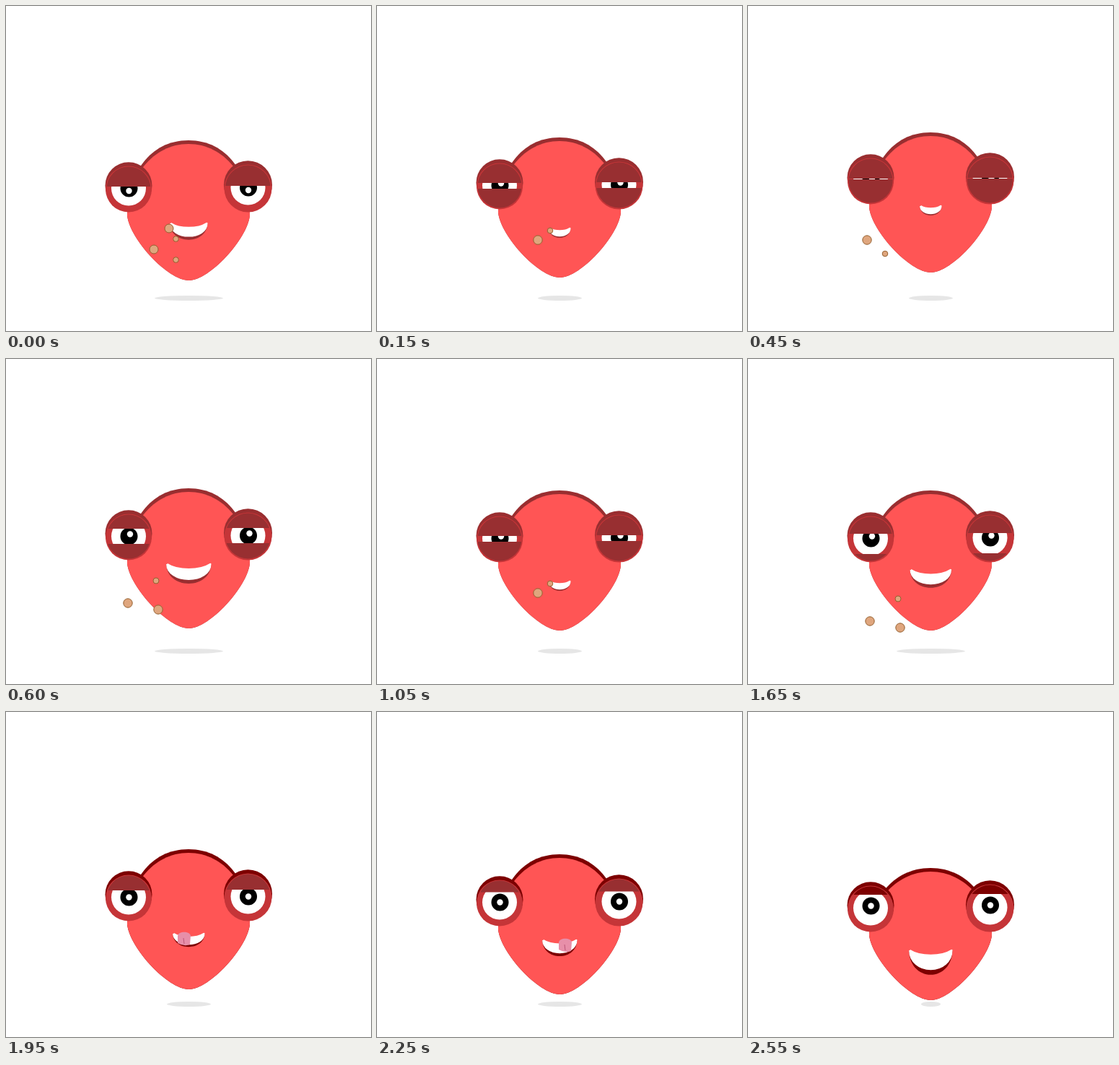
Recreate the animation shown at these times as an HTML page with a canvas. Size 506 by 450 pixels, loop 2.7 s.

```html
<!DOCTYPE html>
<html>
<head>
<meta charset="utf-8">
<style>
html, body { margin: 0; width: 100%; height: 100%; overflow: hidden; background: #fff; }
canvas { display: block; }
</style>
</head>
<body>
<canvas width="506" height="450"></canvas>
<script>
const ctx = document.querySelector('canvas').getContext('2d');
const STEP = 150, POSES = 18, CHEW = 6;

function fill(color) { ctx.fillStyle = color; ctx.fill(); }

function disc(x, y, r, color, ry = r) {
  ctx.beginPath();
  ctx.ellipse(x, y, r, ry, 0, 0, 7);
  fill(color);
}

function egg(top, bulge, color) {
  ctx.beginPath();
  ctx.moveTo(168, 290);
  ctx.bezierCurveTo(168, top + 47, 203 - bulge, top, 253, top);
  ctx.bezierCurveTo(303 + bulge, top, 338, top + 47, 338, 290);
  ctx.bezierCurveTo(335, 322, 282, 380, 253.5, 380);
  ctx.bezierCurveTo(224, 380, 171, 322, 168, 290);
  fill(color);
}

function body(dy, flatten, dark) {
  ctx.save();
  ctx.translate(0, dy);
  egg(186 + flatten, 4, dark);
  egg(191 + flatten, 0, '#ff5555');
  ctx.restore();
}

function eye(x, y, r, gaze, glint, lids, dark, lidColor) {
  disc(x, y - r / 10, r, dark);
  disc(x, y + 1.5, r - 0.5, '#c53538');
  disc(x, y + 0.5, 24, '#fff');
  disc(x + 0.5, y + gaze, 12, '#000');
  disc(x + 0.5 + glint[0], y + gaze + glint[1], 4.2, '#fff');
  ctx.save();
  ctx.beginPath();
  ctx.arc(x, y + 1, r - 2, 0, 7);
  ctx.clip();
  ctx.fillStyle = lidColor;
  ctx.fillRect(x - 40, y - 40, 80, 40 + lids.upper);
  ctx.fillRect(x - 40, y + lids.lower, 80, 40);
  ctx.restore();
}

function mouth(x, { y, w, depth }, dark) {
  const dip = w * 0.31;
  const shape = (half, d) => {
    ctx.beginPath();
    ctx.moveTo(x - half, y);
    ctx.bezierCurveTo(x - half * 0.5, y + dip, x + half * 0.5, y + dip, x + half, y);
    ctx.bezierCurveTo(x + half, y + d * 0.6, x + half * 0.55, y + d, x, y + d);
    ctx.bezierCurveTo(x - half * 0.55, y + d, x - half, y + d * 0.6, x - half, y);
  };
  shape(w, depth * 1.3);
  fill(dark);
  shape(w - 1, depth);
  fill('#fff');
  ctx.strokeStyle = '#fff';
  ctx.lineWidth = 2.4;
  ctx.lineJoin = 'round';
  ctx.stroke();
}

function tongue(x, y) {
  ctx.beginPath();
  ctx.moveTo(x - 9, y + 13);
  ctx.lineTo(x - 9, y + 3);
  ctx.bezierCurveTo(x - 8, y - 4, x + 8, y - 4, x + 9, y + 3);
  ctx.lineTo(x + 8, y + 15);
  ctx.quadraticCurveTo(x, y + 18, x - 9, y + 13);
  fill('#e78fa9');
  ctx.beginPath();
  ctx.moveTo(x - 1, y + 6);
  ctx.lineTo(x, y + 14);
  ctx.strokeStyle = '#bd5878';
  ctx.lineWidth = 1;
  ctx.stroke();
}

function crumb(x, y, r) {
  disc(x, y, r, '#dfa67e');
  ctx.strokeStyle = '#94602f';
  ctx.lineWidth = 1;
  ctx.stroke();
}

// Crumbs scatter below the mouth, get spat to the left, then fall.
function crumbs(beat) {
  if (beat === 0) {
    for (let i = 0; i < 4; i++) {
      crumb(i % 2 ? 235.5 : 226 - 10.5 * i, 308 + 14.5 * i, i % 2 ? 3.8 : 6);
    }
  } else if (beat < 4) {
    const age = beat - 1;
    for (let i = 0; i < 2; i++) {
      crumb(223 + 17 * i - (29 - 4 * i) * age, 324 - 13 * i + 16 * i * age, 6.2 - 2.4 * i);
    }
  } else {
    const fall = 25 * (beat - 4);
    crumb(169, 338 + fall, 6.2);
    crumb(211, 347 + fall, 6.2);
    crumb(208, 307 + fall, 4);
  }
}

// The mouth shuts on beats 1 to 3 while the eyes squeeze, then both reopen.
function chewPose(beat) {
  const shut = beat > 0 && beat < 4, b = beat || CHEW;
  const w = shut ? 15 : 41 - 2.5 * b;
  return {
    lids: shut ? { upper: b / 2 - 3.5, lower: 8 - 3 * b }
               : { upper: 4 * b - 26, lower: 11 * (b - 3) },
    lips: { y: shut ? 324 - 12 * b : 271 + 5 * b, w, depth: w * 0.67 }
  };
}

// After the last bite the eyes open and the smile grows.
function smilePose(p) {
  const grow = p * p;
  return {
    lids: { upper: -9 - 9 * p, lower: 40 },
    lips: { y: 303 + 8 * grow, w: 22 + 8 * grow, depth: 14 + 12 * grow }
  };
}

function draw(n) {
  const ending = n > 2 * CHEW, last = n === POSES - 1, beat = n % CHEW;
  const { lids, lips } = ending ? smilePose((n - 13) / 4) : chewPose(beat);
  const dy = Math.round(3.7 * (ending ? n - 12 : Math.abs(beat - 3) - 3));
  const dark = ending ? '#7d0000' : '#992e30';
  const lidColor = last ? dark : '#982f31';
  const spread = last ? 0 : ending ? 1 : Math.min(2, Math.abs(beat - 2));

  ctx.fillStyle = '#fff';
  ctx.fillRect(0, 0, 506, 450);
  disc(253.5, 404.5, 13.5 + 17 * spread, '#e6e6e6', 3.5);
  body(dy, last ? 11 : 0, dark);

  const gaze = last ? -2.5 : 0.5;
  const glint = ending ? [0, 0] : beat === 0 ? [0, 3.5] : [1.5, -3];
  eye(170, 252 + dy, 32.5, gaze, glint, lids, dark, lidColor);
  eye(335.5, 251 + dy, 33.5, gaze, glint, lids, dark, lidColor);

  ctx.save();
  ctx.translate(0, dy);
  mouth(253.3, lips, dark);
  if (ending && n < 16) tongue(247 + (n - 13) * 7, lips.y);
  ctx.restore();

  if (!ending) crumbs(beat);
}

function tick() {
  draw(Math.floor(performance.now() / STEP) % POSES);
  requestAnimationFrame(tick);
}
tick();
</script>
</body>
</html>
```
